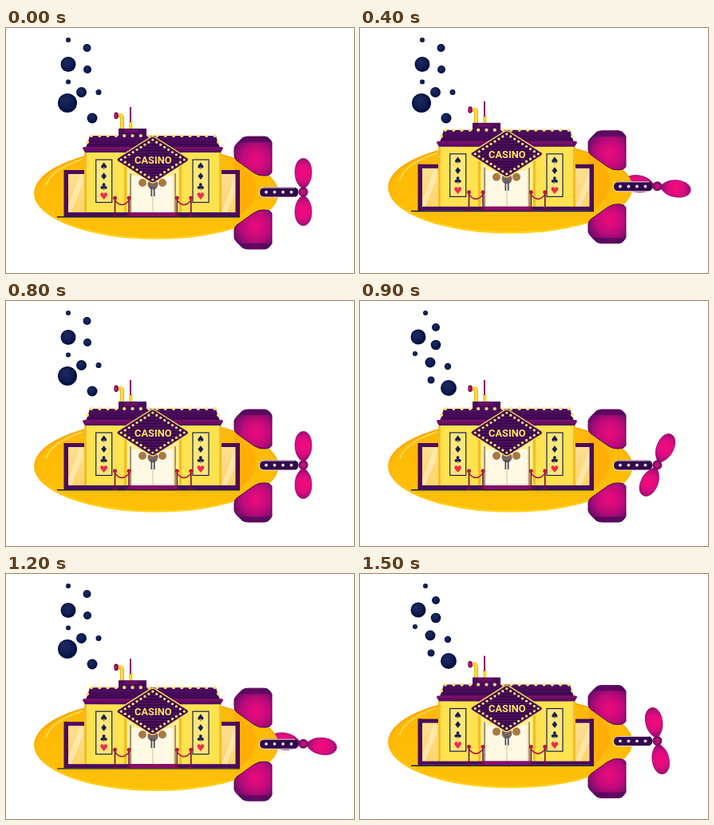
An HTML page with a canvas for the animation above (1600 ms loop, 436 px wide and 307 px high).

```html
<!DOCTYPE html>
<html lang="en">
<head>
<meta charset="utf-8">
<title>Casino submarine</title>
<style>
html, body { margin: 0; width: 100%; height: 100%; overflow: hidden; background: #fff; }
canvas { display: block; }
</style>
</head>
<body>
<canvas id="stage" width="436" height="307"></canvas>
<script>
const ctx = document.getElementById('stage').getContext('2d');
const PURPLE = '#4a0b5c', DARK = '#36084e', NAVY = '#17204f', MAGENTA = '#8b0c68', BULB = '#ffe873';
const LOOP = 1600, STEP = 100;

// Bubble poses: x, y, radius
const LEFT = [[67, 14, 3], [90.5, 24, 4.8], [67, 44, 9.3], [86, 45, 3], [96.5, 61.5, 5],
  [83, 73, 6.5], [105.5, 79.5, 3.2], [83, 95, 6.5], [112.5, 105.5, 14.3]];
const MIDDLE = [[82, 15, 3], [95, 33, 5], [73, 45, 9.5], [95, 55, 6.3], [69, 66, 3],
  [88, 77, 6.5], [110, 82, 4.2], [89, 99, 4.5], [111, 109, 10]];
const RIGHT = [[78, 15, 3], [101.5, 25, 5], [78, 45.5, 9.5], [102, 52, 5], [78, 67.5, 3],
  [94.5, 80.5, 6.5], [116, 80.5, 3.5], [77, 94, 12], [108, 113, 6.5]];
const BUBBLES = [RIGHT, MIDDLE, LEFT, MIDDLE];

function rect(x, y, w, h, fill) {
  ctx.fillStyle = fill;
  ctx.fillRect(x, y, w, h);
}

function disc(x, y, r, fill, ry = r) {
  ctx.beginPath();
  ctx.ellipse(x, y, r, ry, 0, 0, Math.PI * 2);
  ctx.fillStyle = fill;
  ctx.fill();
}

function path(d, fill, stroke, width = 1) {
  const p = new Path2D(d);
  if (fill) { ctx.fillStyle = fill; ctx.fill(p); }
  if (stroke) { ctx.strokeStyle = stroke; ctx.lineWidth = width; ctx.stroke(p); }
}

function blend(gradient, ...colors) {
  colors.forEach((c, i) => gradient.addColorStop(i / (colors.length - 1), c));
  return gradient;
}

const vertical = (y0, y1, ...colors) => blend(ctx.createLinearGradient(0, y0, 0, y1), ...colors);
const radial = (x, y, r, ...colors) => blend(ctx.createRadialGradient(x, y, 0, x, y, r), ...colors);

function drawBubbles(pose) {
  for (const [x, y, r] of pose) {
    disc(x, y, r, '#051043');
    disc(x - r * 0.08, y - r * 0.08, r * 0.78, radial(x - r * 0.2, y - r * 0.3, r, '#1c2a5e', '#0a184e'));
  }
}

function drawPropeller(angle) {
  ctx.save();
  ctx.translate(372.5, 205.5);
  ctx.rotate(angle);
  for (let i = 0; i < 2; i++) {
    path('M0 -3 C-6 -8 -10.5 -14 -10.5 -25 C-10.5 -35 -6 -42 0 -42 C6 -42 10.5 -35 10.5 -25 C10.5 -14 6 -8 0 -3Z',
      radial(0, -24, 20, '#f80a7c', '#dc0c7f', '#8e0a70'), '#93096f', 0.8);
    ctx.rotate(Math.PI);
  }
  ctx.restore();
}

function drawHull() {
  disc(188.3, 207, 153.3, vertical(150, 265, '#f99a05', '#ffb405', '#ffd21a'), 57.8);
  disc(189, 206.5, 150, vertical(150, 263, '#ffb808', '#ffbc06', '#ffc008'), 55.8);
  path('M50 198 C54 183 72 172 96 164', null, '#ffd648', 2);
  path('M286 166 C312 180 318 198 309 218 L293 237 H286Z', '#ffae08');
}

function drawFins() {
  const fin = 'M286 150 Q287 147 290 144 L296 138 Q299 136 303 136 L324 136 Q328 136 331 140' +
    ' Q334 143 333 147 L333 181 Q331 185 325 185 Q317 186 310 181 L289 166 Q286 163 286 160Z';
  for (const flip of [1, -1]) {
    ctx.save();
    ctx.translate(0, 206.5);
    ctx.scale(1, flip);
    ctx.translate(0, -206.5);
    path(fin, radial(313, 165, 34, '#ee0a7c', '#c00a7b', '#570c64'), '#4a0a59');
    path('M298 137 L328 137 L332 143 L292 143Z', 'rgba(61,8,82,.55)');
    ctx.restore();
  }
}

function drawShaft() {
  ctx.beginPath();
  ctx.roundRect(317.5, 199.5, 49, 12.5, 6);
  ctx.fillStyle = '#310a4c';
  ctx.fill();
  path('M362 200 H324 Q317.5 200 317.5 206 Q317.5 212 324 212 H362', null, '#f5e7ed', 1);
  for (let x = 326; x < 365; x += 10.5) disc(x, 205.7, 1.9, '#eee3f5');
  disc(372.5, 205.5, 6, '#7c0c6b');
  disc(372.5, 205.5, 3.4, '#c01273');
}

function drawPeriscope() {
  path('M139 109.5 H143 Q145.5 109.5 145.5 114 V127', null, '#e5a70c', 5);
  path('M139 109 H143 Q145.5 109 145.5 114 V127', null, '#ffda38', 3.4);
  disc(138, 109.7, 2.8, '#6c0b65', 4.3);
  disc(137.5, 109.7, 1.4, '#d3147a', 2.5);
  rect(154, 117, 4.5, 10, '#ffd22c');
  rect(155, 99, 2, 19, '#850b65');
}

function drawRoof() {
  rect(141, 126, 35, 10, PURPLE);
  rect(148, 127, 18, 4, '#6b0e62');
  path('M105 135 H263 Q265 143 268 150 H100 Q103 143 105 135Z', vertical(135, 151, '#4a0b5f', '#36084e'));
  for (let y = 138; y < 149; y += 3) rect(105, y, 158, 0.7, 'rgba(110,20,105,.5)');
  path('M96 151 Q96 149 98 149 H270 Q272 149 272 151 L269 156 H99Z', vertical(149, 156, '#85106c', '#4a0b5c'));
  for (let i = 0; i <= 15; i++) disc(107 + i * 10.3, 135, 2.1, BULB);
  for (const x of [102, 266]) disc(x, 143, 2, BULB);
}

function drawWing(x, post) {
  rect(x, 180, 25, 56, vertical(180, 236, '#fbdf94', '#ffd368'));
  path(`M${x + 3} 228 L${x + 20} 184 H${x + 23} V196 L${x + 8} 233 H${x + 3}Z`, 'rgba(255,240,190,.65)');
  rect(x, 178, 25, 5, PURPLE);
  rect(post, 178, 5.5, 58, PURPLE);
}

function drawCards(x, suits) {
  rect(x, 165, 20, 53.5, '#ffe77c');
  ctx.strokeStyle = NAVY;
  ctx.lineWidth = 1.2;
  ctx.strokeRect(x, 165, 20, 53.5);
  ctx.font = '12px "DejaVu Sans", sans-serif';
  [...suits].forEach((suit, i) => {
    ctx.fillStyle = suit === '♥' ? '#ed2d4c' : NAVY;
    ctx.fillText(suit, x + 10, 174 + i * 12.7);
  });
}

function drawBuilding() {
  drawWing(73, 72.5);
  drawWing(268, 287.5);
  rect(98, 156, 172, 80, '#ffe250');
  for (const x of [98, 148, 217, 267]) rect(x, 156, 3, 80, '#f3bd25');
  drawCards(112.7, '♠♦♣♥');
  drawCards(234, '♠♦♣♥');

  rect(152, 157, 64, 79, '#fff09a');
  rect(158, 186, 51, 50, '#fff9e4');
  for (const x of [155.5, 211.5]) rect(x, 182, 1, 54, '#51355c');
  rect(183.5, 190, 1, 46, '#d9c18f');

  rect(74, 231, 219, 5, PURPLE);
  rect(153, 231, 62, 5, MAGENTA);
  for (const x of [171, 196]) disc(x, 194, 5, '#a87942');
  disc(184, 196, 6.5, '#79665f');
  for (const x of [181.5, 185]) rect(x, 199, 1.6, 12, '#46476a');
  path('M64 236.7 H293', null, NAVY, 1.4);
}

// Bulbs spaced evenly round a diamond.
function diamondBulbs(cx, cy, w, h, perSide) {
  for (let i = 0; i < perSide; i++) {
    const u = i / perSide, v = 1 - u;
    for (const [dx, dy] of [[u, -v], [v, u], [-u, v], [-v, -u]]) disc(cx + dx * w, cy + dy * h, 1.6, BULB);
  }
}

function drawSign() {
  const diamond = 'M180 137.5 Q183.8 134.5 187.6 137.5 L227 162.5 Q230.5 165 227 167.5 L187.6 192.5 Q183.8 195.5 180 192.5 L140.6 167.5 Q137 165 140.6 162.5Z';
  path(diamond, DARK);
  ctx.save();
  ctx.clip(new Path2D(diamond));
  for (let y = 141; y < 192; y += 3.5) rect(140, y, 88, 0.8, '#6b1764');
  ctx.restore();
  path(diamond, null, '#ffdf5c', 1.4);
  diamondBulbs(183.8, 165, 39.5, 25, 8);

  // Pick the size at which the word fills its place on the sign.
  const setFont = size => { ctx.font = `bold ${size}px Roboto, sans-serif`; };
  ctx.fontStretch = 'condensed';
  setFont(16);
  setFont(Math.min(17, 16 * 46.5 / ctx.measureText('CASINO').width));
  ctx.fillStyle = '#ffe45b';
  ctx.fillText('CASINO', 184.3, 166);
  ctx.fontStretch = 'normal';
}

function drawBarrier(x) {
  path(`M${x} 216 Q${x + 8.7} 227 ${x + 17.5} 216`, null, '#a5164d', 1.6);
  for (const post of [x, x + 17.5]) {
    rect(post - 0.8, 213, 1.6, 23, '#74103f');
    rect(post - 3, 234.5, 6, 2, '#74103f');
    disc(post, 213, 2.5, '#b51b39');
  }
}

function draw(time) {
  const frame = Math.floor((time % LOOP) / STEP);
  // The boat bobs on every second step: up first, then down.
  const beat = Math.floor(frame / 2);
  const bob = [0, -3.7, -7.2, -3.7, 0, 3.6, 7.2, 3.6][beat];

  ctx.clearRect(0, 0, 436, 307);
  ctx.textAlign = 'center';
  ctx.textBaseline = 'middle';
  drawBubbles(BUBBLES[frame % 4]);

  ctx.save();
  ctx.translate(0, bob);
  drawPropeller((frame % 8) * 24.3 * Math.PI / 180);
  drawHull();
  drawPeriscope();
  drawBuilding();
  drawRoof();
  drawSign();
  drawBarrier(136.5);
  drawBarrier(214.3);
  drawFins();
  drawShaft();
  ctx.restore();
}

const start = performance.now();
function tick() {
  draw(performance.now() - start);
  requestAnimationFrame(tick);
}
tick();
</script>
</body>
</html>
```
